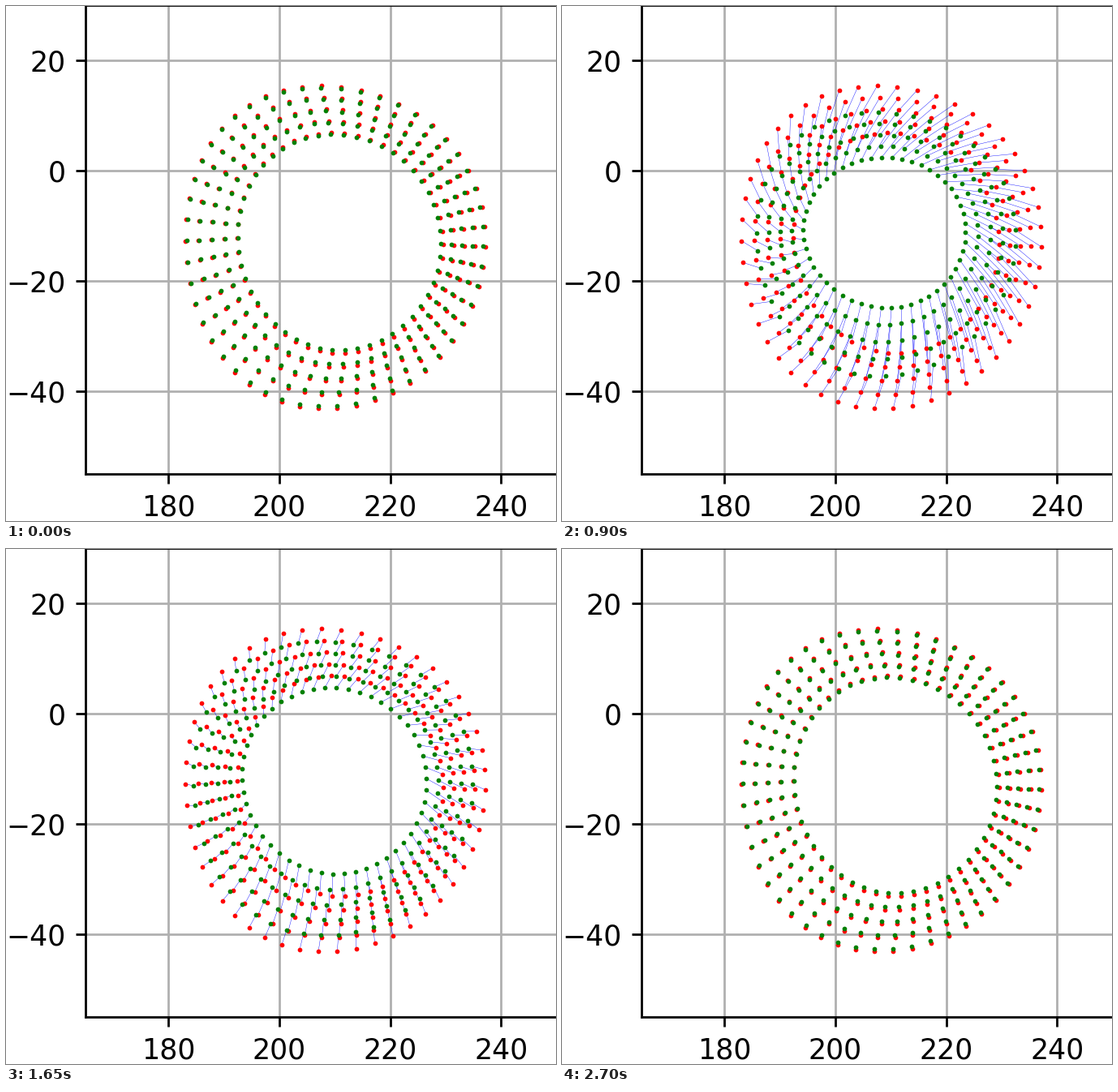
These frames come from a looping animation (678 by 635 pixels, 2.85 s). A matplotlib script:

```python
import numpy as np
import matplotlib.pyplot as plt
from matplotlib.animation import FuncAnimation
from matplotlib.collections import LineCollection
from matplotlib.ticker import MultipleLocator

W, H, DPI = 678, 635, 250
FRAMES, INTERVAL = 19, 150
SPOKES, LAYERS = 50, 5
ANGLE = 2 * np.pi * np.arange(SPOKES) / SPOKES  # clockwise from the top

# Contraction of the wall over the loop: quick squeeze, slow release.
BEAT_FRAMES = np.array([0, 4, 6, 9, 11, 14, 18])
BEAT_LEVELS = np.array([0.022, 0.265, 0.316, 0.18, 0.155, 0.07, 0.022])


def contraction(frame):
    """Smooth cubic easing through the beat levels."""
    slopes = np.gradient(BEAT_LEVELS, BEAT_FRAMES)
    i = np.clip(np.searchsorted(BEAT_FRAMES, frame, "right") - 1,
                0, len(BEAT_FRAMES) - 2)
    span = BEAT_FRAMES[i + 1] - BEAT_FRAMES[i]
    s = (frame - BEAT_FRAMES[i]) / span
    return ((1 + 2 * s) * (1 - s) ** 2 * BEAT_LEVELS[i]
            + s * (1 - s) ** 2 * span * slopes[i]
            + s * s * (3 - 2 * s) * BEAT_LEVELS[i + 1]
            + s * s * (s - 1) * span * slopes[i + 1])


class Ring:
    """Slightly lopsided ellipse that shrinks, twists and drifts."""

    def __init__(self, centre, harmonics, shrink, shift, sway=0, extra_twist=0):
        self.centre, self.shrink, self.shift = centre, shrink, shift
        self.sway, self.extra_twist = sway, extra_twist
        self.arm = sum(coef * np.exp(1j * order * ANGLE)
                       for order, coef in harmonics.items())

    def at(self, level):
        sx, sy = (1 - level * k for k in self.shrink)
        twist = level ** 2 + self.extra_twist * level
        arm = sx * self.arm.real + 1j * sy * self.arm.imag
        drift = level * (self.shift + self.sway * np.cos(ANGLE) ** 2)
        return self.centre + drift + arm * np.exp(1j * twist)

    def rest(self):
        return self.centre + self.arm


outer = Ring(209.56 - 13.55j,
             {-1: -1.33 + 28.31j, 1: -0.04 + 1.12j,
              2: -0.56 - 0.26j, 3: -0.07 - 0.19j},
             shrink=(0.44, 0.58), shift=-2.4 + 2.0j)
inner = Ring(210.8 - 12.95j,
             {-1: -0.95 + 19.26j, 1: -0.28 + 0.72j, 2: -0.17 - 0.12j},
             shrink=(0.68, 1.0), shift=-6.5 + 5.95j,
             sway=1.8, extra_twist=0.09)


def fill_wall(outside, inside):
    depth = np.linspace(0, 1, LAYERS)[:, None]
    return ((1 - depth) * outside + depth * inside).ravel()


rest = fill_wall(outer.rest(), inner.rest())

fig = plt.figure(figsize=(W / DPI, H / DPI), dpi=DPI, facecolor="white")
ax = fig.add_axes([97.75 / W, 57.75 / H, 581 / W, 578 / H])
ax.set(xlim=(165, 250), ylim=(-55, 30))
for axis in (ax.xaxis, ax.yaxis):
    axis.set_major_locator(MultipleLocator(20))
ax.grid(True)
ax.set_axisbelow(True)

links = LineCollection([], colors="blue", linewidths=0.12, zorder=2)
ax.add_collection(links, autolim=False)
dot = dict(marker="o", ls="", ms=1.65, mew=0)
ax.plot(rest.real, rest.imag, color="red", zorder=3, **dot)
moved_dots, = ax.plot([], [], color="green", zorder=4, **dot)


def update(frame):
    level = contraction(frame)
    moved = fill_wall(outer.at(level), inner.at(level))
    moved_dots.set_data(moved.real, moved.imag)
    ends = np.stack([rest, moved], axis=1)
    links.set_segments(np.stack([ends.real, ends.imag], axis=2))
    return links, moved_dots


anim = FuncAnimation(fig, update, frames=FRAMES, interval=INTERVAL,
                     repeat=True, repeat_delay=0)
plt.show()
```
